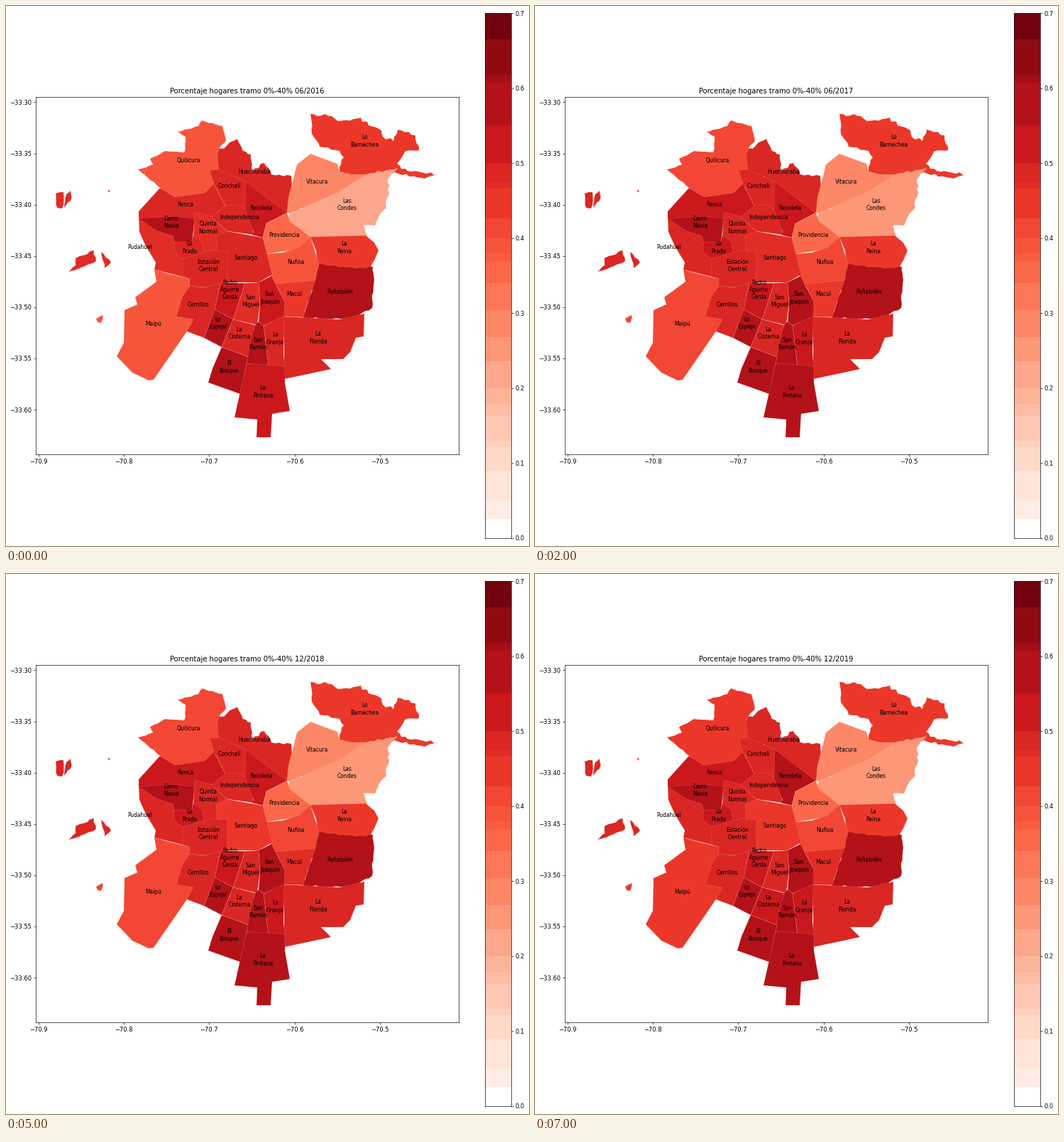
A matplotlib script for the animation above (8 s loop, 737 by 760 pixels).

```python
import numpy as np
import matplotlib.pyplot as plt
from matplotlib.animation import FuncAnimation
from matplotlib.patches import Polygon, Rectangle

W, H, DPI = 737, 760, 64
PX = 72 / DPI  # points per pixel
plt.rcParams["font.family"] = "DejaVu Sans"
plt.rcParams["axes.linewidth"] = 0.67 * PX

DATES = [f"{month}/{year}" for year in range(2016, 2020) for month in ("06", "12")]
TOP_SHARE = 0.7
LEVELS = [0, .026, .05, .09, .12, .13, .163, .178, .2, .236, .268, .304, .34,
          .368, .38, .4, .426, .466, .475, .5, .55, .608, .618, .665, TOP_SHARE]
reds = plt.get_cmap("Reds")
rng = np.random.default_rng(4)

fig = plt.figure(figsize=(W / DPI, H / DPI), dpi=DPI, facecolor="white")


def pixel_axes(left, top, right, bottom):
    """Axes whose data units are stage pixels, y pointing down."""
    ax = fig.add_axes([left / W, 1 - bottom / H, (right - left) / W, (bottom - top) / H])
    ax.set_xlim(left, right)
    ax.set_ylim(bottom, top)
    ax.tick_params(labelsize=8.33 * PX, length=2.9 * PX, width=0.67 * PX, pad=2.9 * PX)
    return ax


def shade(share):
    """Colour of the band that holds this share."""
    i = np.searchsorted(LEVELS, share, side="right")
    if i == 1:
        return "white"
    return reds((LEVELS[i - 1] + LEVELS[i]) / 2 / TOP_SHARE)


def jagged(points, amount, step=6):
    """Split each edge and push the new points sideways at random."""
    out = []
    for a, b in zip(points, np.roll(points, -1, axis=0)):
        side = b - a
        length = np.hypot(*side)
        n = int(length // step) + 1
        push = rng.normal(0, amount, n)
        push[0] = 0
        normal = np.array([-side[1], side[0]]) / length
        out.extend(a + np.outer(np.arange(n) / n, side) + np.outer(push, normal))
    return out


ax = pixel_axes(42, 128, 638, 631)
ax.set_xticks([45.5 + 120.4 * i for i in range(5)],
              [f"\u2212{70.9 - 0.1 * i:.1f}" for i in range(5)])
ax.set_yticks([135.5 + 72.1 * i for i in range(7)],
              [f"\u2212{33.3 + 0.05 * i:.2f}" for i in range(7)])

areas = []


def area(outline, first, last=None, rough=0):
    points = np.reshape(outline, (-1, 2)).astype(float)
    if rough:
        points = jagged(points, rough)
    patch = Polygon(points, closed=True, lw=0.6 * PX, edgecolor=(1, 1, 1, 0.18))
    ax.add_patch(patch)
    areas.append((patch, first, first if last is None else last))


def region(name, x, y, outline, first, last=None, rough=0):
    area(outline, first, last, rough)
    ax.text(x, y, name, ha="center", va="center", fontsize=7.5 * PX)


# Back to front: later regions cover the hidden edges of earlier ones.
region("Lo\nBarnechea", 505.5, 190,
       [429, 152, 459, 155, 468, 162, 500, 157, 511, 168, 529, 175, 531, 184, 546, 190,
        552, 174, 577, 182, 582, 203, 562, 205, 551, 222, 566, 232, 609, 237, 590, 243,
        553, 236, 508, 240, 467, 236, 476, 213, 470, 204, 442, 198, 431, 180],
       .44, rough=1.2)
region("Las\nCondes", 480.5, 279.5,
       [508, 237, 552, 228, 538, 244, 540, 262, 536, 284, 525, 297, 520, 309, 504, 309,
        507, 327, 429, 330, 397, 303, 400, 292], .23, .255, rough=1)
region("Huechuraba", 350.5, 233,
       [294, 209, 314, 193, 326, 187, 334, 204, 345, 209, 347, 233, 364, 221, 374, 237,
        402, 239, 404, 260, 396, 291, 345, 275, 300, 240], .49, rough=1)
region("Vitacura", 439, 247,
       [404, 247, 410, 223, 429, 208, 467, 222, 470, 233, 486, 237, 508, 237, 469, 262,
        432, 278, 400, 292, 396, 291, 398, 270], .286)
region("Quilicura", 257.5, 217.5,
       [186, 230, 207, 223, 203, 215, 224, 204, 251, 206, 253, 184, 242, 177, 271, 169,
        276, 161, 305, 169, 310, 190, 298, 205, 299, 240, 293, 262, 238, 272, 217, 256],
       .388, .428, rough=0.5)
region("Pudahuel", 188.5, 339.5,
       [187, 298, 188, 318, 197, 338, 211, 361, 209, 371, 260, 384, 260, 340, 230, 300],
       .467, .49)
region("Maipú", 208, 448,
       [209, 371, 230, 377, 259, 384, 270, 400, 270, 440, 255, 458, 208, 526, 201, 527,
        178, 516, 156, 493, 166, 474, 167, 428, 185, 420, 182, 410, 212, 388], .388, .425)
region("Renca", 253, 280,
       [217, 256, 238, 269, 280, 263, 293, 250, 309, 281, 300, 300, 230, 305, 187, 300,
        187, 289], .485, .53)
region("Cerro\nNavia", 233, 304.5,
       [187, 299, 238, 296, 266, 299, 262, 335, 237, 335, 236, 324, 212, 316], .575)
region("Lo\nPrado", 258.5, 340,
       [237, 332, 262, 332, 264, 322, 280, 332, 280, 350, 249, 356, 237, 347], .48, .52)
region("Quinta\nNormal", 285, 312,
       [266, 290, 290, 296, 312, 317, 300, 346, 279, 348, 277, 332, 264, 323], .472, .49)
region("Estación\nCentral", 285, 365.5,
       [249, 356, 279, 347, 300, 342, 315, 345, 312, 389, 280, 396, 259, 394, 259, 384,
        249, 381], .485)
region("Conchalí", 314.5, 253.5,
       [287, 231, 299, 230, 338, 247, 340, 288, 309, 281, 293, 250], .49)
region("Independencia", 328.5, 298,
       [309, 281, 325, 279, 345, 290, 349, 322, 312, 317, 290, 297], .485)
region("Recoleta", 359.5, 285,
       [338, 247, 360, 264, 396, 291, 367, 306, 362, 326, 346, 322, 349, 318, 337, 288],
       .505, .5545)
region("Providencia", 391.5, 322.5,
       [396, 291, 400, 303, 429, 325, 412, 342, 367, 349, 362, 326, 367, 306], .354)
region("La\nReina", 476.5, 340,
       [429, 325, 507, 323, 519, 333, 525, 344, 519, 358, 512, 370, 440, 372, 437, 345],
       .43)
region("Nuñoa", 408, 360.5,
       [367, 349, 390, 347, 412, 340, 429, 325, 441, 363, 436, 388, 380, 393, 370, 376],
       .39, .415)
region("Peñalolén", 470.5, 402.5,
       [441, 363, 492, 369, 517, 367, 519, 385, 516, 425, 488, 440, 419, 440, 424, 421,
        436, 386], .575, rough=0.8)
region("La\nFlorida", 439.5, 467,
       [390, 437, 470, 441, 505, 433, 504, 465, 493, 467, 485, 487, 475, 497, 444, 497,
        458, 511, 430, 517, 392, 525, 392, 480], .485)
region("Macul", 406, 406, [380, 391, 436, 386, 424, 421, 419, 438, 390, 437, 393, 416],
       .44, .469)
region("Santiago", 338.5, 354.5,
       [296, 324, 312, 317, 362, 326, 375, 378, 356, 389, 312, 389, 312, 345, 298, 346],
       .49, .46)
region("San\nMiguel", 344.5, 415.5, [337, 390, 356, 389, 358, 420, 354, 449, 320, 441],
       .472, .49)
region("San\nJoaquín", 372, 411,
       [356, 389, 374, 380, 393, 416, 392, 437, 363, 450, 356, 444, 358, 420], .53, .562)
region("Pedro\nAguirre\nCerda", 315.5, 399.5,
       [302, 390, 337, 390, 320, 441, 294, 427], .525)
region("Cerrillos", 271, 421,
       [259, 394, 280, 396, 302, 390, 294, 428, 279, 467, 255, 458, 264, 441, 240, 437,
        249, 408], .485)
region("Lo\nEspejo", 298.5, 446.5, [294, 427, 320, 441, 304, 480, 279, 467], .575)
region("La\nCisterna", 329, 460.5, [320, 441, 351, 449, 341, 494, 304, 480], .485, .5)
region("La\nGranja", 379.5, 468, [363, 450, 392, 436, 391, 490, 393, 507, 370, 508],
       .485, .53)
region("San\nRamón", 355.5, 475.5,
       [351, 449, 356, 444, 363, 450, 370, 508, 339, 503, 345, 470], .575)
region("El\nBosque", 314.5, 508, [304, 480, 341, 494, 330, 546, 285, 530, 291, 510], .575)
region("La\nPintana", 362, 543,
       [339, 503, 393, 507, 393, 530, 400, 570, 375, 574, 373, 607, 353, 607, 354, 582,
        322, 579], .53, .57)

# Detached pieces to the west
for piece in ([70, 264, 81, 262, 79, 285, 72, 284], [85, 265, 91, 260, 91, 274, 82, 284],
              [142, 259, 146, 259, 146, 262], [134, 346, 148, 361, 139, 369],
              [88, 374, 98, 365, 98, 355, 124, 344, 127, 359, 106, 368]):
    area(piece, .467, .49, rough=0.7)
area([127, 440, 137, 435, 134, 446, 129, 445], .388, .425, rough=0.5)

bar = pixel_axes(675, 10, 712, 749)
bar.set_xticks([])
bar.yaxis.tick_right()
per_share = 739 / TOP_SHARE
bar.set_yticks([749 - per_share * i / 10 for i in range(8)],
               [f"{i / 10:.1f}" for i in range(8)])
for low, high in zip(LEVELS, LEVELS[1:]):
    bar.add_patch(Rectangle((675, 749 - per_share * high), 37, per_share * (high - low),
                            color=shade(low), lw=0, antialiased=False))

title = ax.set_title("", fontsize=10 * PX, pad=5 * PX)


def draw(step):
    t = step / (len(DATES) - 1)
    # Fast early growth with a slight two-year wave
    progress = 1 - (1 - t) ** 3 - 0.08 * np.sin(np.pi * step / 2)
    for patch, first, last in areas:
        patch.set_facecolor(shade(first + (last - first) * progress))
    title.set_text(f"Porcentaje hogares tramo 0%-40% {DATES[step]}")
    return [title]


anim = FuncAnimation(fig, draw, frames=len(DATES), interval=1000, repeat=True, repeat_delay=0)
plt.show()
```
